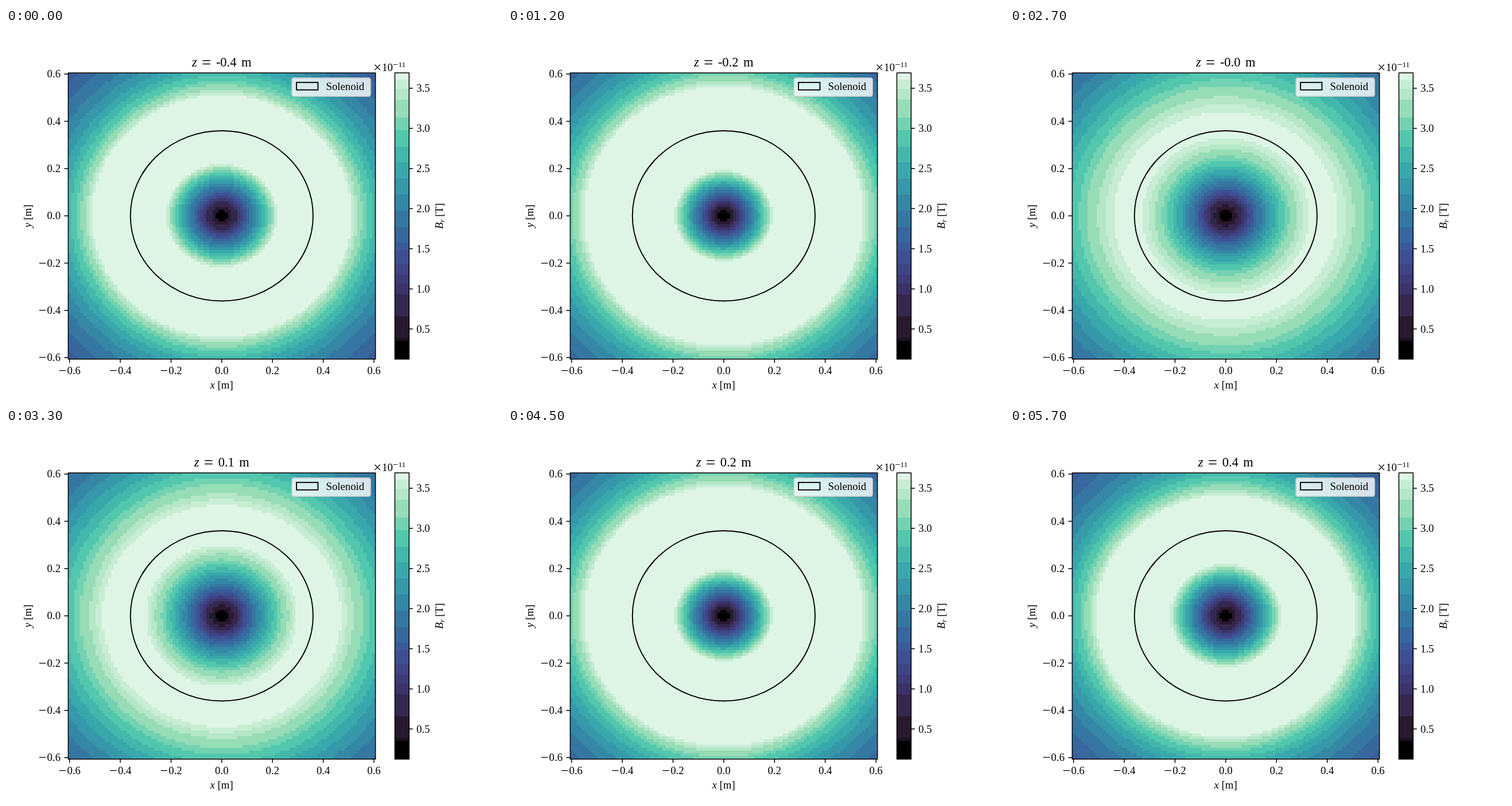
Animation of 864x648 px, one loop 6 s. Source, as an HTML page with a canvas:

```html
<!DOCTYPE html>
<html lang="en">
<head>
<meta charset="utf-8">
<title>Radial field of a solenoid</title>
<style>
  html, body { margin: 0; width: 100%; height: 100%; overflow: hidden; background: #fff; }
  canvas, svg { position: absolute; left: 0; top: 0; width: 864px; height: 648px; }
  text { font: 18.75px "Liberation Serif", "Times New Roman", serif; fill: #000; }
  .title text { font-size: 22.5px; }
  .math { font-style: italic; }
  .line { fill: none; stroke: #000; stroke-width: 1.5; }
  .coil { stroke-width: 1.9; }
</style>
</head>
<body>
<canvas id="field" width="864" height="648"></canvas>
<svg viewBox="0 0 864 648">
  <ellipse class="line coil" cx="375.84" cy="327.24" rx="159.1" ry="148.2"/>
  <rect x="498" y="87" width="137" height="32" rx="3.5" fill="#fff" fill-opacity=".8" stroke="#ccc" stroke-opacity=".8" stroke-width="1.9"/>
  <rect class="line coil" x="506" y="94.8" width="37.4" height="13"/>
  <text x="557.5" y="108" >Solenoid</text>
  <rect class="line" x="108.4" y="78.2" width="535.2" height="498.6"/>
  <rect class="line" x="677.4" y="78.2" width="24.8" height="498.6"/>
  <path id="ticks" class="line"/>
  <g id="labels"></g>
  <g class="title">
    <text id="titleVar" class="math" y="67">z</text>
    <text id="titleEq" y="69.5" style="font-size:29px">=</text>
    <text id="titleNum" y="67" text-anchor="end"></text>
    <text id="titleUnit" y="67" text-anchor="end">m</text>
  </g>
  <text x="375.6" y="628" text-anchor="middle"><tspan class="math">x</tspan> [m]</text>
  <text transform="translate(44 327.5) rotate(-90)" text-anchor="middle"><tspan class="math">y</tspan> [m]</text>
  <text transform="translate(761 327.5) rotate(-90)" text-anchor="middle"><tspan class="math">B</tspan><tspan class="math" font-size="13" style="font-size:13px" dy="3">r</tspan><tspan dy="-3"> [T]</tspan></text>
  <text x="640" y="75"><tspan style="font-size:25px" dy="1.5">×</tspan><tspan dy="-1.5" dx="1">10</tspan><tspan style="font-size:17px" dy="-5.6">−</tspan><tspan style="font-size:13.1px" dy="-1.2">11</tspan></text>
</svg>
<script>
const $ = id => document.getElementById(id);
const ctx = $('field').getContext('2d');

const FRAMES = 20, FRAME_MS = 300, CELLS = 100;
const LEFT = 108, TOP = 77.76, WIDTH = 535.68, HEIGHT = 498.96;
const RADIUS = 0.36, HALF_LENGTH = 0.3;

// Colour map, cut into flat bands
const stops = ['0b0405', '28192f', '3b2f5e', '40498e', '366a9f', '348aa6', '38aaac', '54c9ad', 'a0dfb9', 'def5e5']
  .map(hex => [0, 2, 4].map(i => parseInt(hex.slice(i, i + 2), 16)));
const bandTops = [545, 540, 502, 464, 445, 430, 411, 387, 374, 347, 318, 290, 262, 234, 207, 178, 156, 125, 106, 90, TOP];
const bandEnds = bandTops.map(y => (TOP + HEIGHT - y) / HEIGHT);

function mapColor(t) {
  const pos = t * (stops.length - 1), i = Math.min(Math.floor(pos), stops.length - 2);
  return `rgb(${stops[i].map((c, j) => Math.round(c + (stops[i + 1][j] - c) * (pos - i)))})`;
}
const bandColors = bandEnds.map((end, i) =>
  i === 0 ? '#000' : i === bandEnds.length - 1 ? mapColor(1) : mapColor((end + bandEnds[i - 1]) / 2));

function bandColor(t) {
  const i = bandEnds.findIndex(end => t < end);
  return i < 0 ? bandColors[bandColors.length - 1] : bandColors[i];
}

// Radial field of one solenoid end: elliptic integrals by arithmetic-geometric mean
function endField(r, dz) {
  const m = 4 * RADIUS * r / ((RADIUS + r) ** 2 + dz * dz);
  let a = 1, b = Math.sqrt(1 - m), sum = 0;
  for (let n = 1, w = 2; n < 7; n++, w *= 2) {
    const c = (a - b) / 2;
    sum += w * c * c;
    [a, b] = [(a + b) / 2, Math.sqrt(a * b)];
  }
  return Math.sqrt(RADIUS / r) * Math.PI / (4 * a) * sum / Math.sqrt(m);
}
const field = (r, z) => endField(r, z - HALF_LENGTH) + endField(r, z + HALF_LENGTH);

const heightAt = frame => -0.4 + 0.8 * frame / (FRAMES - 1);
const coord = i => -0.6 + 1.2 * i / (CELLS - 1);

function forCells(visit) {
  for (let j = 0; j < CELLS; j++)
    for (let i = 0; i < CELLS; i++) visit(i, j, Math.hypot(coord(i), coord(j)));
}

// The central slice sets the colour limits
let low = Infinity, high = 0;
forCells((i, j, r) => {
  const value = field(r, heightAt(9));
  low = Math.min(low, value);
  high = Math.max(high, value);
});

const edgeX = i => Math.round(LEFT + WIDTH * i / CELLS);
const edgeY = j => Math.round(TOP + HEIGHT * j / CELLS);

function drawField(z) {
  forCells((i, j, r) => {
    ctx.fillStyle = bandColor((field(r, z) - low) / (high - low));
    ctx.fillRect(edgeX(i), edgeY(j), edgeX(i + 1) - edgeX(i), edgeY(j + 1) - edgeY(j));
  });
}

function drawTitle(z) {
  const shift = z < 0 ? 0 : 3.75;
  $('titleNum').textContent = z.toFixed(1);
  $('titleVar').setAttribute('x', 324 + shift);
  $('titleEq').setAttribute('x', 341 + shift);
  $('titleNum').setAttribute('x', 401.5 - shift);
  $('titleUnit').setAttribute('x', 427.5 - shift);
}

function drawColorbar() {
  let bottom = 577;
  bandTops.forEach((y, i) => {
    const top = Math.round(y);
    ctx.fillStyle = bandColors[i];
    ctx.fillRect(677, top, 25, bottom - top);
    bottom = top;
  });
}

function drawAxes() {
  let path = '', labels = '';
  const label = (x, y, value, anchor) => {
    const sign = value < 0 ? '<tspan style="font-size:25px" dy="2">−</tspan><tspan dy="-2" dx="1">' : '<tspan>';
    labels += `<text x="${x}" y="${y}" text-anchor="${anchor}">${sign}${Math.abs(value).toFixed(1)}</tspan></text>`;
  };
  for (let n = -3; n <= 3; n++) {
    const x = 375.84 + n * 88.39, y = 327.24 - n * 82.33;
    path += `M${x} 576.7v6.6M108 ${y}h-6.6`;
    label(x, 603, n / 5, 'middle');
    label(95, y + 6.2, n / 5, 'end');
  }
  for (let n = 1; n <= 7; n++) {
    const y = 594.2 - n * 69.9;
    path += `M702.2 ${y}h6.6`;
    label(715, y + 6.2, n / 2, 'start');
  }
  $('ticks').setAttribute('d', path);
  $('labels').innerHTML = labels;
}

let shown = -1;
function tick() {
  const frame = Math.floor(performance.now() / FRAME_MS) % FRAMES;
  if (frame !== shown) {
    shown = frame;
    drawField(heightAt(frame));
    drawTitle(heightAt(frame));
  }
  requestAnimationFrame(tick);
}

drawColorbar();
drawAxes();
tick();
</script>
</body>
</html>
```
